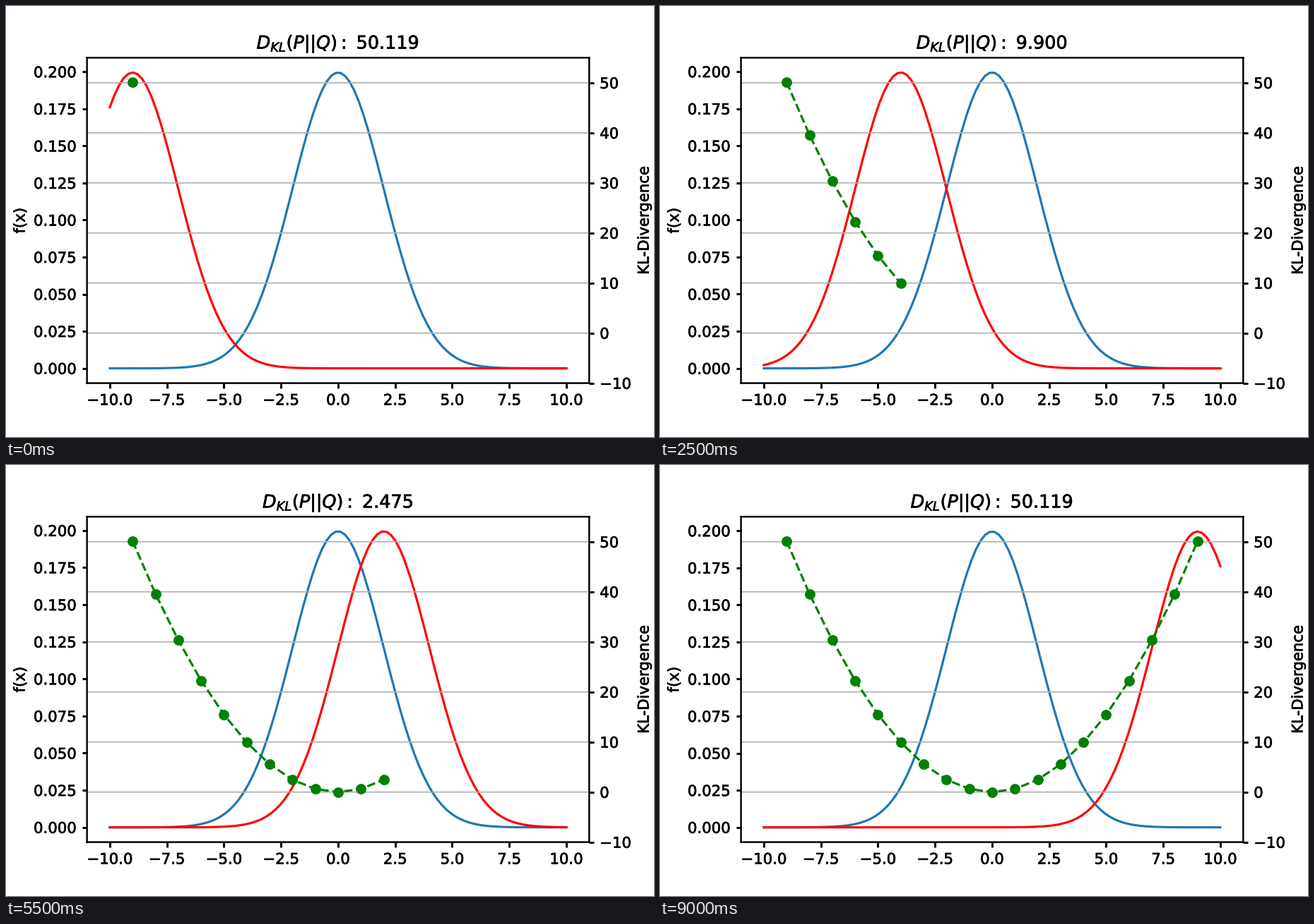
Write a matplotlib script that moves like this. It is 917 by 611 pixels and loops after 9.5 s.

```python
import numpy as np
import matplotlib.pyplot as plt
from matplotlib.animation import FuncAnimation
from matplotlib.patheffects import withStroke

W, H, DPI = 917, 611, 152.8
SIGMA = 2
MEANS = np.arange(-9, 10)
BOLDER = [withStroke(linewidth=0.34, foreground="black")]

plt.rcParams["font.family"] = "DejaVu Sans"

x = np.linspace(-10, 10, 100)


def normal(mu):
    return np.exp(-((x - mu) / SIGMA) ** 2 / 2) / (SIGMA * np.sqrt(2 * np.pi))


def divergence(mu):
    p, q = normal(0), normal(mu)
    return np.sum(p * np.log(p / q))


KL = [divergence(mu) for mu in MEANS]

fig = plt.figure(figsize=(W / DPI, H / DPI), dpi=DPI, facecolor="white")
fig.subplots_adjust(left=0.125, right=0.9, bottom=0.125, top=0.88)
ax = fig.add_subplot()
ax.plot(x, normal(0), color="tab:blue")
moving, = ax.plot(x, normal(MEANS[0]), color="red")
ax.set_ylabel("f(x)")

ax_kl = ax.twinx()
trail, = ax_kl.plot([], [], "o--", color="green")
ax_kl.set_ylim(-10, 55)
ax_kl.set_ylabel("KL-Divergence")
ax_kl.grid(True, snap=False)

# One heavy frame, drawn above the grid
ax.spines[:].set_visible(False)
for spine in ax_kl.spines.values():
    spine.set(linewidth=1.15, snap=False)
for axes in (ax, ax_kl):
    axes.tick_params(width=1.4)


def update(i):
    moving.set_ydata(normal(MEANS[i]))
    ax.relim()
    ax.autoscale_view()
    trail.set_data(MEANS[:i + 1], KL[:i + 1])
    ax.set_title(rf"$D_{{KL}}(P||Q):$ {KL[i]:.3f}")

    labels = [ax.title, ax.yaxis.label, ax_kl.yaxis.label]
    labels += ax.get_xticklabels() + ax.get_yticklabels()
    labels += ax_kl.get_yticklabels()
    for label in labels:
        label.set_path_effects(BOLDER)
    return moving, trail


anim = FuncAnimation(fig, update, frames=len(MEANS), interval=500,
                     init_func=lambda: update(0), repeat=True, repeat_delay=0)
plt.show()
```
